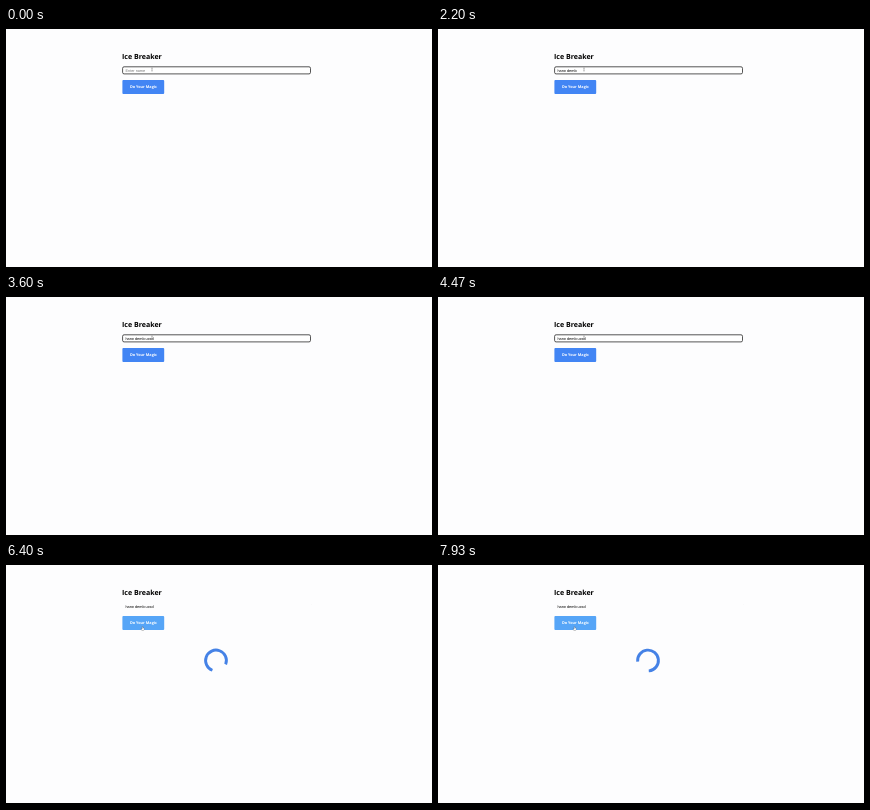
An HTML page for the animation above (8 s loop, 426 px wide and 240 px high).

```html
<!DOCTYPE html>
<html lang="en">
<head>
<meta charset="utf-8">
<title>Ice Breaker</title>
<style>
  html, body { margin: 0; width: 100%; height: 100%; overflow: hidden; background: #fdfdfe; }
  svg { display: block; width: 100%; height: 100%; }
  text { text-rendering: geometricPrecision; }
  .bold { font-family: "Open Sans", "Noto Sans", sans-serif; font-weight: 700; }
  .field { font: 3.8px "Liberation Sans", sans-serif; }
</style>
</head>
<body>
<svg viewBox="0 0 426 240">
  <rect width="426" height="240" fill="#fdfdfe"/>
  <rect width="426" height="1"/>
  <rect y="239" width="426" height="1"/>

  <text class="bold" x="116" y="30.7" font-size="7.05">Ice Breaker</text>

  <rect id="focus" x="116.6" y="38.8" width="187.9" height="7.1" rx="1.5"
        fill="#fff" stroke="#2a2a2a" stroke-width="0.8"/>
  <text id="value" class="field" x="119.5" y="43.5"></text>

  <rect id="button" x="116.4" y="52.1" width="41.8" height="13.8" rx="1"/>
  <text class="bold" x="123.9" y="60.3" font-size="3.8" fill="#fff">Do Your Magic</text>

  <circle id="spinner" cx="210" cy="96.5" r="10.4" fill="none"
          stroke="#4582e6" stroke-width="2.9" pathLength="360" stroke-dasharray="272 88"/>

  <path id="beam" d="M-.6 -1.5H.6M0 -1.5V1.5M-.6 1.5H.6" fill="none" stroke="#555" stroke-width="0.4"/>
  <path id="hand" d="M-.4 -1.8H.3V-.5L1.6 -.1V1.2L1 2.2H-.8L-1.6 .4L-.4 .6Z"
        fill="#fff" stroke="#333" stroke-width="0.25"/>
</svg>
<script>
const LOOP = 8000;
const CLICK = 5837;
const SPIN = 1300;
const MOVE_START = 5480, MOVE_END = 5780;
const ENTRY = "hano demb ucsd";
const KEY_TIMES = [300, 385, 470, 555, 640, 725, 810, 895, 1200, 2500, 2670, 2840, 3010, 3180];

const [focusRing, value, button, spinner, beam, hand] =
  ["focus", "value", "button", "spinner", "beam", "hand"].map(id => document.getElementById(id));

const show = (node, visible) => node.setAttribute("visibility", visible ? "visible" : "hidden");
const mix = (a, b, k) => a + (b - a) * k;

function draw(t) {
  const typed = KEY_TIMES.filter(time => time <= t).length;
  value.textContent = typed ? ENTRY.slice(0, typed) : "Enter name";
  value.setAttribute("fill", typed ? "#000" : "#757575");

  const k = Math.min(1, Math.max(0, (t - MOVE_START) / (MOVE_END - MOVE_START)));
  const ease = k * k * (3 - 2 * k);
  const x = mix(146, 136.6, ease), y = mix(41.5, 64.3, ease);
  const hovering = y > 52;
  for (const pointer of [beam, hand]) pointer.setAttribute("transform", `translate(${x} ${y})`);
  show(beam, !hovering);
  show(hand, hovering);
  button.setAttribute("fill", hovering ? "#56a5f7" : "#4285f4");

  const clicked = t >= CLICK;
  show(focusRing, !clicked);
  show(spinner, clicked);
  // The gap begins at the top and turns clockwise.
  const angle = -90 + 44 + 360 * (t - CLICK) / SPIN;
  spinner.setAttribute("transform", `rotate(${angle} 210 96.5)`);
}

function tick() {
  draw(performance.now() % LOOP);
  requestAnimationFrame(tick);
}
tick();
</script>
</body>
</html>
```
